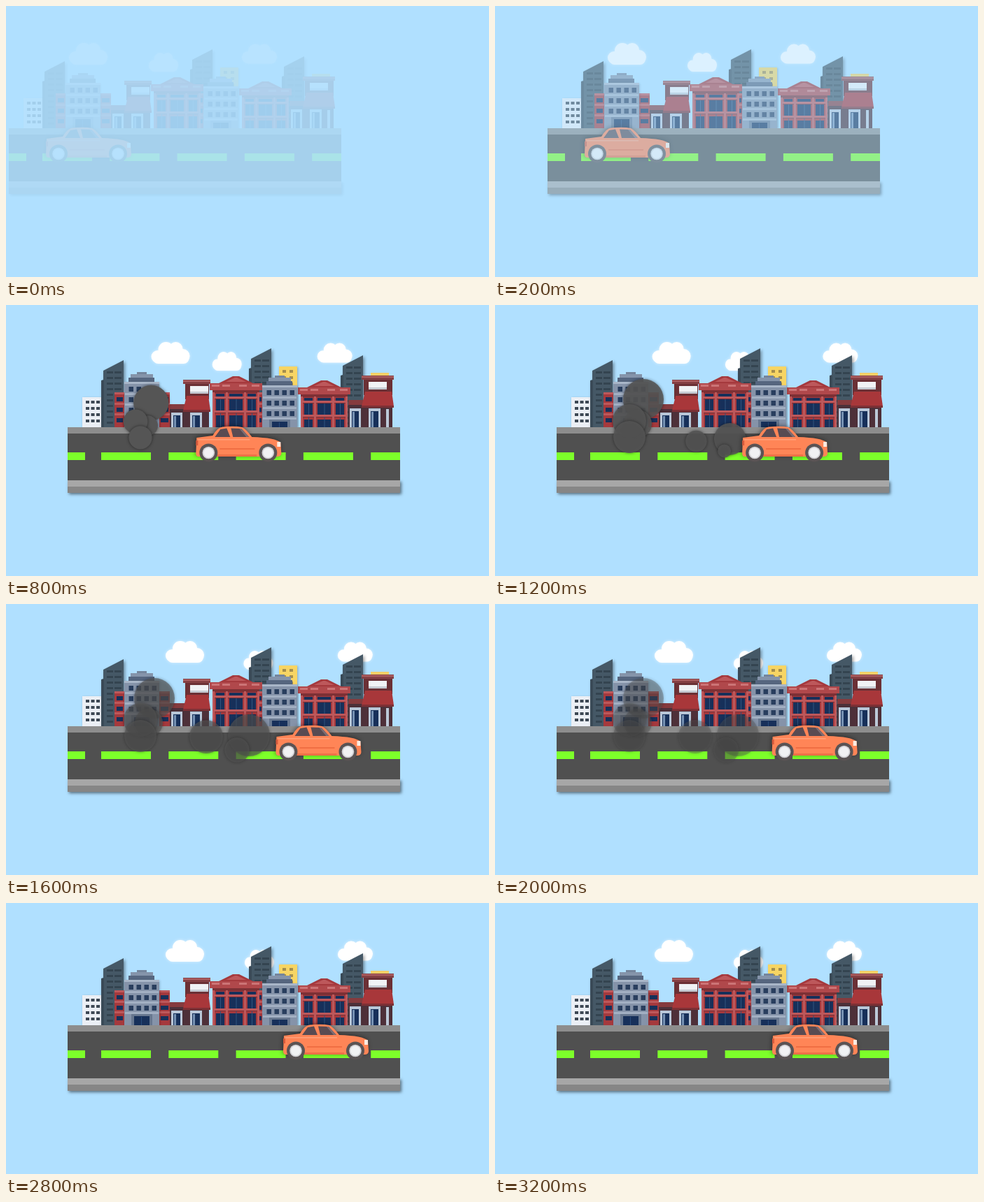
An HTML page with a canvas that plays this animation: 690 px wide and 388 px high, repeating every 4000 ms.

```html
<!DOCTYPE html>
<html lang="en">
<head>
<meta charset="utf-8">
<title>Car in the city</title>
<style>
  html, body { margin: 0; width: 100%; height: 100%; overflow: hidden; background: #b0e0ff; }
  canvas { display: block; }
</style>
</head>
<body>
<canvas id="stage" width="690" height="388"></canvas>
<script>
const stage = document.getElementById('stage');
const ctx = stage.getContext('2d');
const LOOP = 4000, STEP = 100;
const TAU = Math.PI * 2;
const NAVY = '#17305a', BRICK = '#a5393d', ROSE = '#bd585b', MAROON = '#6b3035', WINE = '#7d3035';

// y of cubic-bezier(.27, .1, .17, 1) at x
function ease(x) {
  if (x <= 0) return 0;
  if (x >= 1) return 1;
  const curve = (s, a, b) => 3 * a * s * (1 - s) ** 2 + 3 * b * s * s * (1 - s) + s ** 3;
  let lo = 0, hi = 1;
  for (let i = 0; i < 24; i++) {
    const mid = (lo + hi) / 2;
    if (curve(mid, .27, .17) < x) lo = mid; else hi = mid;
  }
  return curve(lo, .1, 1);
}

function rect(color, x, y, w, h) {
  ctx.fillStyle = color;
  ctx.fillRect(x, y, w, h);
}

function poly(color, ...points) {
  ctx.fillStyle = color;
  ctx.beginPath();
  for (let i = 0; i < points.length; i += 2) ctx.lineTo(points[i], points[i + 1]);
  ctx.fill();
}

function disc(color, x, y, r) {
  ctx.fillStyle = color;
  ctx.beginPath();
  ctx.arc(x, y, r, 0, TAU);
  ctx.fill();
}

function at(x, y, draw) {
  ctx.save();
  ctx.translate(x, y);
  draw();
  ctx.restore();
}

function shaded(draw, color = 'rgba(0,0,0,.4)', offset = 2, blur = 4) {
  ctx.save();
  ctx.shadowColor = color;
  ctx.shadowOffsetX = ctx.shadowOffsetY = offset;
  ctx.shadowBlur = blur;
  draw();
  ctx.restore();
}

function cloud(x, y, w, h) {
  at(x, y, () => {
    ctx.scale(w / 55, h / 31);
    shaded(() => {
      ctx.fillStyle = '#fff';
      ctx.beginPath();
      for (const [cx, cy, r] of [[9, 21, 9], [21, 11, 11], [35, 10, 10], [45, 20, 10]]) {
        ctx.moveTo(cx + r, cy);
        ctx.arc(cx, cy, r, 0, TAU);
      }
      ctx.roundRect(2, 15, 52, 16, 8);
      ctx.fill();
    }, 'rgba(255,255,255,.6)', 0, 4);
  });
}

function tower(x, y) {
  at(x, y, () => {
    shaded(() => poly('#455866', 0, 29, 3, 28, 3, 15, 32, 0, 32, 110, 0, 110));
    rect('#3a4a57', 0, 29, 4, 81);
    for (let row = 16; row < 105; row += 8) {
      rect('#344450', 8, row, 9, 3);
      rect('#344450', 19, row, 10, 3);
    }
  });
}

function block(x, y, w, h, wall, pane, cols, rows) {
  shaded(() => rect(wall, x, y, w, h), 'rgba(0,0,0,.25)', 1, 3);
  const gap = w / (cols + .6);
  for (let i = 0; i < cols; i++)
    for (let j = 0; j < rows; j++) rect(pane, x + 5 + i * gap, y + 5 + j * 9, 5, 4);
}

function wing(x, w) {
  rect(BRICK, x, 125, w, 50);
  for (let y = 125; y < 170; y += 15) {
    rect(ROSE, x, y, w, 3);
    rect(NAVY, x + 3, y + 7, w - 5, 6);
  }
}

function office(x, y) {
  at(x, y, () => {
    rect('#75859c', 18, 0, 14, 4);
    rect('#8594aa', 9, 3, 32, 6);
    rect('#56667f', 6, 8, 37, 6);
    shaded(() => rect('#8593a9', 0, 14, 50, 65), 'rgba(0,0,0,.2)', 1, 3);
    rect('#a9b6c8', 0, 14, 50, 3);
    for (let row = 0; row < 3; row++) {
      const top = 21 + row * 15;
      rect('#a3b0c3', 1, top + 9, 48, 3);
      for (let col = 0; col < 4; col++) rect('#293e5e', 6.5 + col * 11, top, 6.5, 7);
    }
    rect('#67778f', 10, 63, 30, 16);
    rect(NAVY, 14, 66, 22, 13);
    rect('#294c7c', 24, 67, 1, 12);
  });
}

function hall(x, y) {
  at(x, y, () => {
    rect(BRICK, 4, 18, 67, 60);
    poly(BRICK, 13, 11, 33, 1, 42, 1, 62, 11);
    poly(ROSE, 23, 9, 36, 3, 39, 3, 52, 9);
    rect('#b0484b', 0, 11, 75, 10);
    for (const left of [3, 18, 42, 60]) rect('#cc7476', left, 13, 11, 3);
    rect(WINE, 4, 21, 67, 4);
    for (const [left, w] of [[9, 12], [28, 19], [54, 12]]) {
      rect(NAVY, left, 26, w, 4);
      rect(NAVY, left, 34, w, 16);
      rect(NAVY, left, 57, w, 18);
      rect('#31547f', left + w / 2, 34, 1, 41);
    }
    for (const top of [30, 50]) {
      rect(ROSE, 4, top, 67, 3);
      rect(WINE, 4, top + 3, 67, 1);
    }
    for (const left of [4, 23, 49, 68]) rect(ROSE, left, 24, 3, 54);
  });
}

function door(x, y, w) {
  rect('#b9c7d8', x, y, w, 27);
  rect(NAVY, x + 3, y + 4, w - 6, 23);
  rect('#7691b3', x + 4, y + 5, 3, 22);
}

function shop(x, y, w) {
  at(x, y, () => {
    rect('#4b3039', -19, 35, 22, 39);
    rect('#853b3e', -19, 35, 22, 7);
    rect('#4e3039', 2, 42, w - 4, 32);
    rect(MAROON, 3, 5, w - 5, 23);
    rect('#854044', 0, 0, w, 6);
    rect('#ad5f61', 0, 1, w, 2);
    rect('#f0f2f5', 10, 9, 26, 11);
    rect('#c5cad2', 10, 17, 26, 3);
    poly('#a8373a', 5, 23, w - 3, 23, w, 44, 0, 44);
    rect(WINE, 0, 43, w, 3);
    door(-17, 47, 16);
    door(10, 47, 17);
    if (w > 40) rect('#bdc9d8', 35, 48, 4, 26);
  });
}

function city() {
  block(109, 132, 27, 43, '#ebeff5', '#3d4854', 3, 4);
  block(390, 88, 26, 87, '#f7d564', '#a58e4d', 2, 9);
  rect('#f2d066', 521, 97, 26, 8);
  tower(136, 79);
  tower(347, 62);
  tower(478, 72);
  ctx.save();
  ctx.beginPath();
  ctx.rect(0, 0, 690, 176);
  ctx.clip();
  wing(155, 14);
  wing(218, 16);
  wing(352, 15);
  shop(253, 107, 39);
  hall(291, 101);
  hall(417, 107);
  office(169, 96);
  office(366, 101);
  shop(508, 101, 46);
  ctx.restore();
}

function road() {
  shaded(() => rect('#868686', 88, 251, 475, 18), 'rgba(0,0,0,.5)', 2, 4);
  rect('#8d8d8d', 88, 175, 475, 9);
  rect('#505050', 88, 184, 475, 67);
  rect('#a7a7a7', 88, 251, 475, 9);
  rect('#7dff2a', 88, 211, 25, 11);
  for (let i = 0; i < 5; i++) {
    const x = 136 + i * 96.3;
    rect('#7dff2a', x, 211, Math.min(71, 563 - x), 11);
  }
}

function wheel(x) {
  disc('#5a5354', x, 37.5, 13);
  disc('#d3d2d6', x, 37.5, 8.8);
  disc('#f1f1f3', x, 37.5, 7);
}

function car(x) {
  at(x, 174, () => {
    shaded(() => {
      ctx.fillStyle = '#ff8557';
      ctx.beginPath();
      ctx.moveTo(1, 16);
      ctx.lineTo(24, 13);
      ctx.quadraticCurveTo(31, 1, 38, .5);
      ctx.quadraticCurveTo(56, -1, 66, 1);
      ctx.quadraticCurveTo(72, 4, 80, 15);
      ctx.quadraticCurveTo(114, 16, 121, 23);
      ctx.lineTo(122, 38);
      ctx.quadraticCurveTo(122, 43, 116, 43);
      ctx.lineTo(4, 43);
      ctx.quadraticCurveTo(0, 43, 0, 38);
      ctx.closePath();
      ctx.fill();
    }, 'rgba(0,0,0,.45)', -1, 6);
    poly('#594b52', 27, 15, 35, 4, 44, 2.5, 49, 15);
    poly('#594b52', 50, 2.5, 65, 3, 76, 15, 53, 15);
    poly('#7c6d73', 62, 3, 65, 3, 76, 15, 72, 15);
    rect('#ffa17b', 3, 18, 74, 1.5);
    rect('#f06e43', 34, 31, 50, 2);
    rect('#ee7047', 29, 40, 58, 3);
    rect('#f9ebe2', 116, 22, 5, 7);
    rect('#d65a3c', 0, 20, 3, 7);
    wheel(18);
    wheel(103);
  });
}

// birth, growth time, start x and y, end x, y and radius, fade end
const puffs = [
  [420, 700, 177, 172, 212, 135, 29, 2700],
  [520, 700, 198, 180, 204, 170, 20, 2700],
  [520, 700, 167, 169, 192, 166, 24, 2700],
  [520, 700, 192, 192, 192, 189, 23, 2700],
  [900, 700, 300, 204, 347, 188, 30, 2600],
  [960, 700, 290, 204, 286, 190, 24, 2600],
  [1000, 700, 325, 209, 330, 209, 18, 2600]
];

function smoke(t) {
  for (const [birth, grow, x0, y0, x1, y1, r, end] of puffs) {
    const p = ease((t - birth) / grow);
    const alpha = Math.min(1, (end - t) / (end - 1000));
    if (p <= 0 || alpha <= 0) continue;
    ctx.save();
    ctx.globalAlpha = alpha;
    shaded(() => disc('#555', x0 + (x1 - x0) * p, y0 + (y1 - y0) * p, r * p), 'rgba(0,0,0,.5)', 0, 4);
    ctx.restore();
  }
}

const slide = [-84, -50, -13, -2, 0];
const fadeIn = [.1, .32, .56, .82, 1];

function draw(t) {
  const step = Math.min(4, t / STEP);
  stage.style.opacity = fadeIn[step];
  ctx.clearRect(0, 0, 690, 388);
  at(slide[step], 0, () => {
    cloud(174 + 54 * ease((t - 400) / 1200), 53, 55, 31);
    cloud(288 + 53 * ease((t - 650) / 1250), 67, 42, 27);
    cloud(421 + 53 * ease((t - 500) / 1200), 54.5, 50, 28);
    city();
    road();
    smoke(t);
    car(141 + 255 * ease((t - 300) / 1800));
  });
}

const start = performance.now();
let shown = -1;
function tick() {
  const t = Math.floor((performance.now() - start) % LOOP / STEP) * STEP;
  if (t !== shown) draw(shown = t);
  requestAnimationFrame(tick);
}
tick();
</script>
</body>
</html>
```
